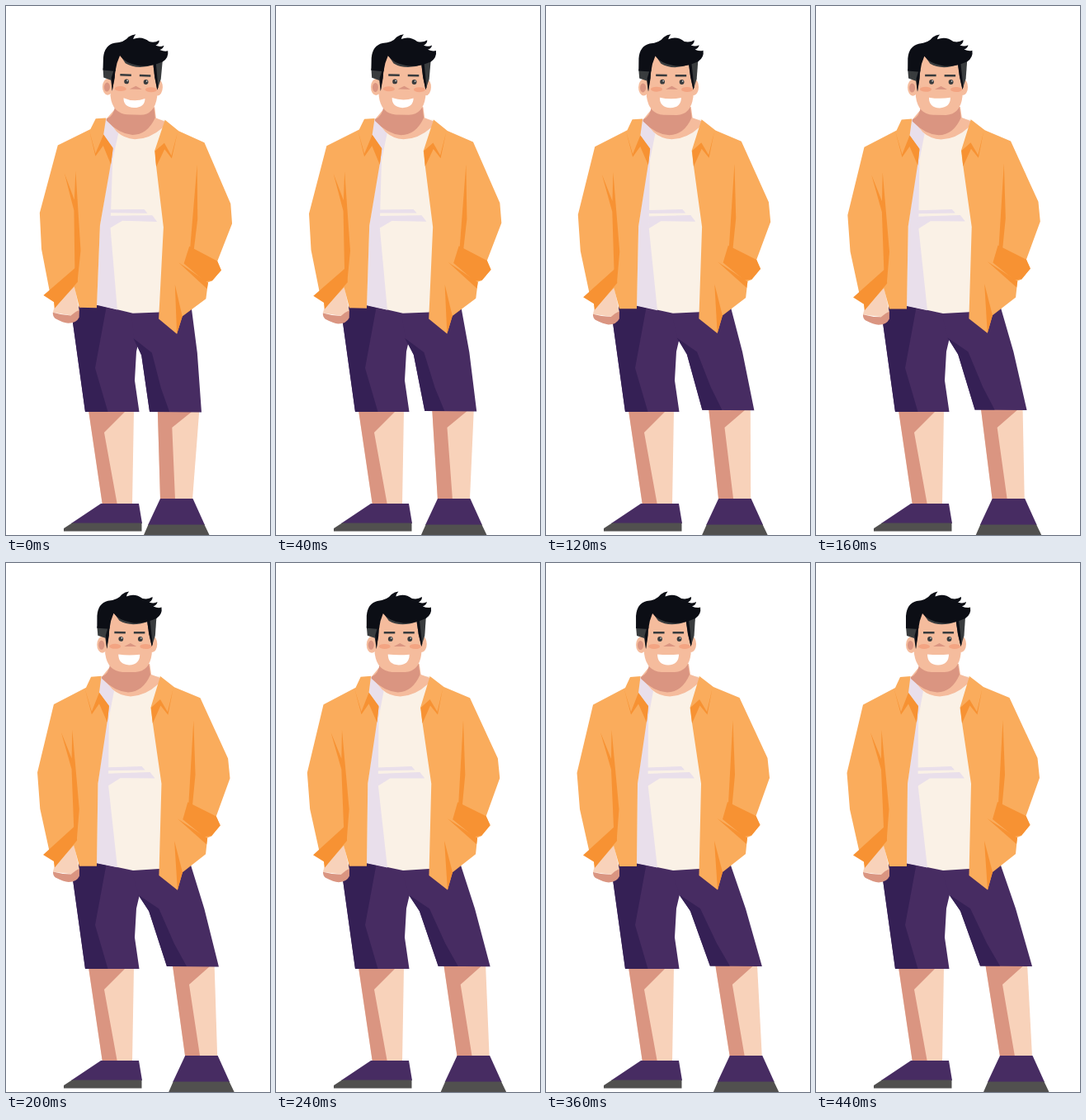
Recreate the animation shown at these times as an HTML page. Size 320 by 640 pixels, loop 0.48 s.

```html
<!DOCTYPE html>
<html lang="en">
<head>
<meta charset="utf-8">
<title>Standing man</title>
<style>
html, body { margin: 0; width: 100%; height: 100%; overflow: hidden; background: #fff; }
svg { display: block; width: 320px; height: 640px; }
.skin { fill: #f8d2ba; }
.shade { fill: #da9581; }
.face { fill: #f5bc9d; }
.cloth { fill: #472c62; }
.deep { fill: #352055; }
.sole { fill: #51504f; }
.coat { fill: #faac5c; }
.fold { fill: #f79233; }
.tee { fill: #faf1e6; }
.lilac { fill: #e9dfeb; }
.hair { fill: #0c0e15; }
.grey { fill: #393c3e; }
.blush { fill: #f3a482; }
.white { fill: #fff; }
</style>
</head>
<body>
<svg viewBox="0 0 320 640">
  <!-- standing leg -->
  <path class="skin" d="M100 489H155L153 604H117Z"/>
  <path class="shade" d="M100 489H146L119 516L135 604H117Z"/>
  <path class="cloth" d="M115 602H161L165 626H79Z"/>
  <path class="sole" d="M80 625.500H164.500V635.500H70V632Z"/>

  <!-- moving leg, drawn with the feet apart -->
  <g id="calf">
    <path class="skin" d="M205 484H256L262 597H223Z"/>
    <path class="shade" d="M205 484H255L226 510L241 597H223Z"/>
  </g>
  <g id="shoe">
    <path class="cloth" d="M223 596H262.500L277 628H208Z"/>
    <path class="sole" d="M208.500 627.500H276.500L282.500 640H203Z"/>
  </g>

  <!-- shorts -->
  <path class="cloth" d="M89 362L81 383L96 491H161.500L156 453L158 418L162 401L180 362Z"/>
  <path class="deep" d="M89 366L110 362L121.500 365L108 438L123.500 491H96L81 383Z"/>
  <g id="thigh">
    <path class="cloth" d="M150 365L162 401.500L175 421L199 487.500L262 488L242 418L223 363Z"/>
    <path class="deep" d="M161 401L187 418L207 460L223 487.500H199L175 421Z"/>
  </g>

  <g id="body">
    <!-- hand -->
    <path class="skin" d="M57 374L60 362L82 340L89 371L80 377Z"/>
    <path class="shade" d="M57 374Q68 377 79 377Q84 372 89 370V379Q86 386 76 386.500Q70 386 60 381Q57 379 57 374Z"/>

    <!-- shirt and neck -->
    <path class="tee" d="M115 137H186L178 185L189 267L186 370L154 372L110 363L111 267L122 185Z"/>
    <path class="lilac" d="M114 137L130 155L124 187L123.500 268L135 368.500L110 363.500L111 267L122 185L110 160Z"/>
    <path class="lilac" d="M123 247.500L164 246L168 250.500L123 251.500Z"/>
    <path class="lilac" d="M123 255L174 253L180 260.500L138 260.500L123 270Z"/>
    <path class="face" d="M115 138L128 122H173L175 135L186 139L184 146Q168 161 150 161.500Q137 161 128 153Z"/>
    <path class="shade" d="M115 138Q124 134 125 122H172L174 135Q165 156 147 156.500Q131 156 115 140Z"/>

    <!-- jacket -->
    <path class="coat" d="M102 138L114.500 137L112 157L124 174L122.500 188L111 267L110 367H89L82 342L59 368L58 361L52 347L41 298L37.500 254L57 171.500L96 151Z"/>
    <path class="coat" d="M186 137L203 150L234.500 163L268.500 236L271 260L254.500 306L259.500 317L249 330L244 332L242 352L214 374L208 395.500L185.500 378L188 267L176.500 190L174.500 175Z"/>
    <path class="fold" d="M66 205L79 237L79.500 202L88.500 298L85.500 337L82 320L79 250Z"/>
    <path class="fold" d="M45 353.500L84 318L86 336L59 369L58 361.500Z"/>
    <path class="fold" d="M94.500 152L103 180L112 157L124 173L122 193L112 170.500L103 183.500Z"/>
    <path class="fold" d="M201.500 152L195 180L186 165L175 175L177 194L186.500 172.500L195.500 183.500Z"/>
    <path class="fold" d="M226.500 190L229 256L225 300L221 291Z"/>
    <path class="fold" d="M220 289L254.500 306L259.500 317L249 329.500L240 331L214 310Z"/>
    <path class="fold" d="M207.500 309L244 332.500L243 340Z"/>
    <path class="fold" d="M204 336L214 374L208 395.500Z"/>

    <!-- head -->
    <ellipse class="face" cx="115.500" cy="99" rx="6.500" ry="10"/>
    <ellipse class="shade" cx="114.500" cy="99.500" rx="3.500" ry="5.500"/>
    <ellipse class="face" cx="176" cy="98" rx="6" ry="10"/>
    <path class="face" d="M118 60H178L175.500 110Q173 131 156 132H140Q122 131 119 110Z"/>
    <ellipse class="blush" id="cheek" cx="131" cy="101" rx="7" ry="3"/>
    <use href="#cheek" x="37"/>
    <path class="shade" d="M142 101L149.500 97L157 101Z"/>
    <g id="eye">
      <path class="grey" d="M130 83H143.500V85.500H130Z"/>
      <circle class="grey" cx="138" cy="92" r="2.900"/>
      <circle class="white" cx="139" cy="91" r=".8"/>
    </g>
    <use href="#eye" x="23.500"/>
    <path class="white" id="smile"/>
    <path class="grey" d="M109 77H124.500L121 104L119 91L110 88Z"/>
    <path class="hair" d="M124 72L123.500 88L121 104L119.500 88Z"/>
    <path class="grey" d="M169.500 69L181 65L179.500 88L175.500 101L172 86Z"/>
    <path class="hair" d="M169.500 69H173L176.500 98L175.500 101L172 86Z"/>
    <path class="grey" d="M129 60L172 65L170 71Q150 78 136 70Z"/>
    <path class="hair" d="M109 79V64Q110 49 122 46Q134 45 139 38Q143 35 147.500 34.500Q144.500 38 144.500 40.500Q155 36 164 43Q171 44.500 176 41Q176.500 45 172 47.500Q178 49.500 182 47Q181.500 51 177 52.500Q183 55 187 53.500Q188.500 62 181 67Q163 75 150 72Q136 70 129 61Q125 70 124 80Z"/>
  </g>
</svg>
<script>
const STEP = 40, LOOP = 480, STRIDE = 36;
const HIP = 370, ANKLE = 597;
const $ = id => document.getElementById(id);
const move = (id, transform) => $(id).setAttribute("transform", transform);

// Slants a part sideways while the line at height y stays in place.
const slant = (y, k, squash = 1) => `matrix(1 0 ${k} ${squash} ${-k * y} ${y * (1 - squash)})`;

function draw(time) {
  const u = Math.floor(time % LOOP / STEP) / (LOOP / STEP - 1);
  const rest = (1 - u) ** 3; // 1: feet together, 0: feet apart
  const shift = `translate(${-STRIDE * rest})`;

  move("shoe", shift);
  move("calf", shift + slant(ANKLE, -0.13 * rest));
  move("thigh", slant(HIP, -0.212 * rest, 1 + 0.029 * rest));
  move("body", `rotate(${1.7 * rest} 165 365)`);

  const lip = 110.5 + 1.5 * rest, sag = 111.5 + 6 * rest;
  $("smile").setAttribute("d", `M135 ${lip}Q148 ${sag} 161 ${lip}Q161 123 148 123.5Q135 123 135 ${lip}Z`);
}

let start;
function tick(now) {
  start ??= now;
  draw(now - start);
  requestAnimationFrame(tick);
}
draw(0);
requestAnimationFrame(tick);
</script>
</body>
</html>
```
